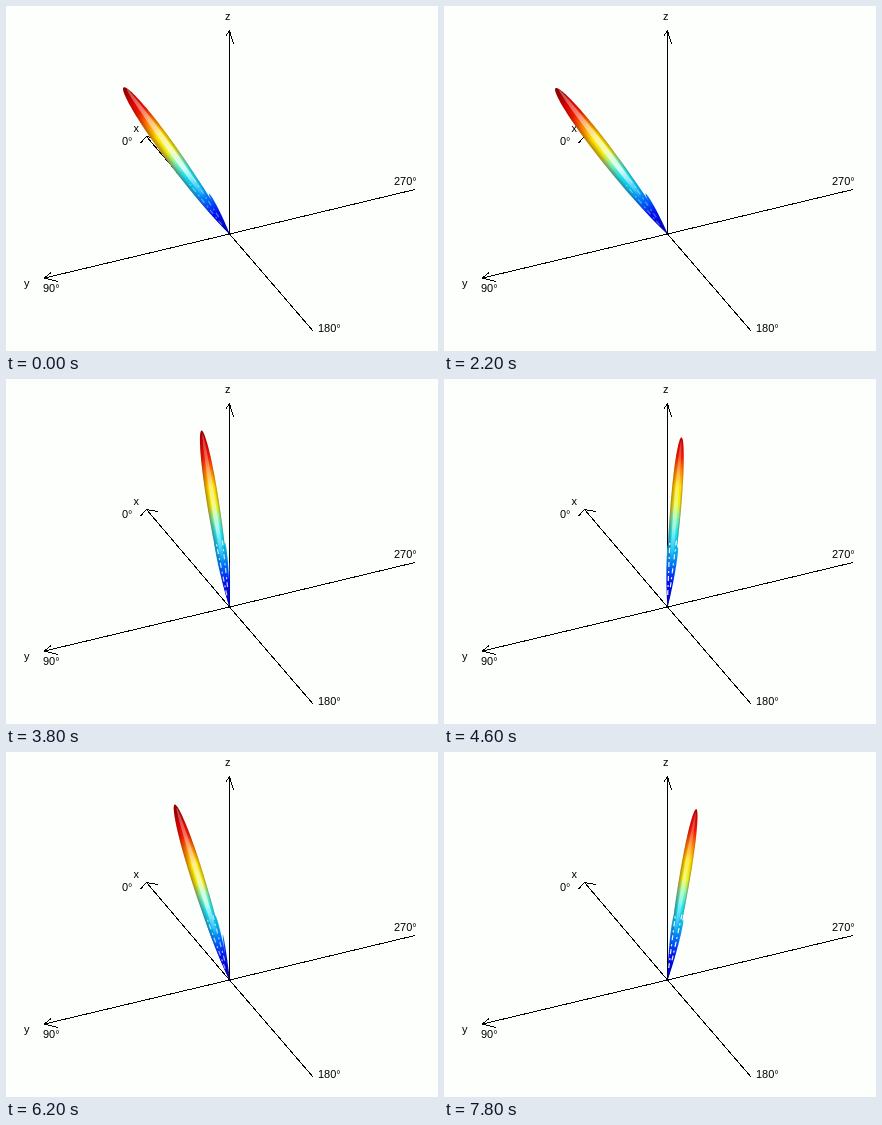
An HTML page for the animation above (8 s loop, 432 by 345 pixels).

```html
<!DOCTYPE html>
<html lang="en">
<head>
<meta charset="utf-8">
<title>Scanning beam</title>
<style>
  html, body { margin: 0; width: 100%; height: 100%; overflow: hidden; background: #fdfffc; }
  svg { display: block; width: 432px; height: 345px; }
  text { font: 11px "Liberation Sans", Arial, sans-serif; }
  .axes { fill: none; stroke: #000; shape-rendering: crispEdges; }
</style>
</head>
<body>
<svg viewBox="0 0 432 345">
  <defs>
    <linearGradient id="level" gradientUnits="userSpaceOnUse" x1="0" x2="176">
      <stop offset="0" stop-color="#0000a8"/>
      <stop offset=".14" stop-color="#0010f0"/>
      <stop offset=".23" stop-color="#0068f8"/>
      <stop offset=".31" stop-color="#00b0f0"/>
      <stop offset=".42" stop-color="#18e4ec"/>
      <stop offset=".51" stop-color="#80f8a8"/>
      <stop offset=".58" stop-color="#e8f418"/>
      <stop offset=".69" stop-color="#ffe000"/>
      <stop offset=".78" stop-color="#ff8000"/>
      <stop offset=".86" stop-color="#f01800"/>
      <stop offset=".94" stop-color="#d00000"/>
      <stop offset="1" stop-color="#980000"/>
    </linearGradient>
    <linearGradient id="shine" gradientUnits="userSpaceOnUse" x1="0" x2="176">
      <stop offset=".25" stop-color="#fff" stop-opacity="0"/>
      <stop offset=".45" stop-color="#fff" stop-opacity=".8"/>
      <stop offset=".62" stop-color="#fff" stop-opacity=".65"/>
      <stop offset=".95" stop-color="#fff" stop-opacity=".35"/>
    </linearGradient>
    <linearGradient id="shade" x2="0" y2="1">
      <stop offset="0" stop-color="#600" stop-opacity=".45"/>
      <stop offset=".35" stop-color="#600" stop-opacity="0"/>
      <stop offset=".8" stop-color="#600" stop-opacity="0"/>
      <stop offset="1" stop-color="#600" stop-opacity=".4"/>
    </linearGradient>
  </defs>

  <path class="axes" d="M223.5 228V24M219.5 30.5L223.5 24.5L227.5 38
    M409 183.5L223.5 228L38.5 272M45 266.5L38.5 272L52 275.5
    M307.5 325.5L223.5 228L140.5 130.5M152 132.5L140.5 130.5L134.5 137"/>
  <text x="219" y="14">z</text>
  <text x="127.5" y="126">x</text>
  <text x="116" y="139">0°</text>
  <text x="18" y="281">y</text>
  <text x="37" y="286">90°</text>
  <text x="388" y="179">270°</text>
  <text x="312" y="326">180°</text>

  <g id="beam" fill="url(#level)">
    <path id="leftLobe" transform="rotate(-4)"/>
    <path id="rightLobe" transform="rotate(5)"/>
    <path id="lowLobe" transform="rotate(9)"/>
    <path id="body"/>
    <path id="edges" fill="url(#shade)"/>
    <path id="highlight" fill="url(#shine)"/>
    <path id="gaps" d="M12 -.8L64 -3M20 1.2L68 3.5" fill="none" stroke="#fff" stroke-width="1.2" stroke-dasharray="5 3 2 4"/>
  </g>
</svg>
<script>
const LOOP = 8000, STEP = 200;
const ORIGIN = { x: 223.5, y: 228 };

// Each sweep moves the tip evenly to the right along a shallow arc.
const sweeps = [
  { start: 0, x: 117.5, dx: 10.4, peakX: 193, peakY: 57.5 },
  { start: 2000, x: 101, dx: 10.5, peakX: 197, peakY: 51.5 },
  { start: 4800, x: 95.5, dx: 10.45, peakX: 204, peakY: 47.3 }
];
const set = (id, name, value) => document.getElementById(id).setAttribute(name, value);

function tipAt(time) {
  const sweep = sweeps.findLast(s => time >= s.start);
  const x = sweep.x + sweep.dx * (time - sweep.start) / STEP;
  return { x, y: sweep.peakY + 0.0042 * (x - sweep.peakX) ** 2 };
}

// Outline of a narrow Gaussian lobe in polar form, pointing along +x.
function lobe(length, halfWidth) {
  const n = 40, upper = [], lower = [];
  for (let i = 0; i <= n; i++) {
    const u = Math.sin(i / n * Math.PI / 2);
    const w = i ? halfWidth * u * Math.sqrt(Math.max(0, -Math.log(u))) / 0.43 : 0;
    const x = (u * length).toFixed(2);
    upper.push(x + " " + (-w).toFixed(2));
    lower.unshift(x + " " + w.toFixed(2));
  }
  return "M" + upper.concat(lower).join("L") + "Z";
}

function draw(time) {
  const tip = tipAt(Math.floor(time / STEP) * STEP);
  const dx = tip.x - ORIGIN.x, dy = tip.y - ORIGIN.y;
  const length = Math.hypot(dx, dy);
  const lean = Math.max(0, -dx / length);
  const halfWidth = 5.4 + 4 * lean;
  const angle = Math.atan2(dy, dx) * 180 / Math.PI;
  const body = lobe(length, halfWidth);

  set("beam", "transform", `translate(${ORIGIN.x} ${ORIGIN.y}) rotate(${angle})`);
  set("body", "d", body);
  set("edges", "d", body);
  set("highlight", "d", lobe(length * 0.98, halfWidth * 0.35));
  set("highlight", "transform", `translate(0 ${lean * 3})`);
  set("highlight", "opacity", Math.min(1, 0.6 + lean));
  set("leftLobe", "d", lobe(length * 0.37, 1.6));
  set("rightLobe", "d", lobe(length * 0.36, 1.6));
  set("lowLobe", "d", lobe(length * 0.25, 2.5 * lean));
  set("gaps", "stroke-opacity", 0.95 - lean);
}

function tick() {
  draw(performance.now() % LOOP);
  requestAnimationFrame(tick);
}
tick();
</script>
</body>
</html>
```
